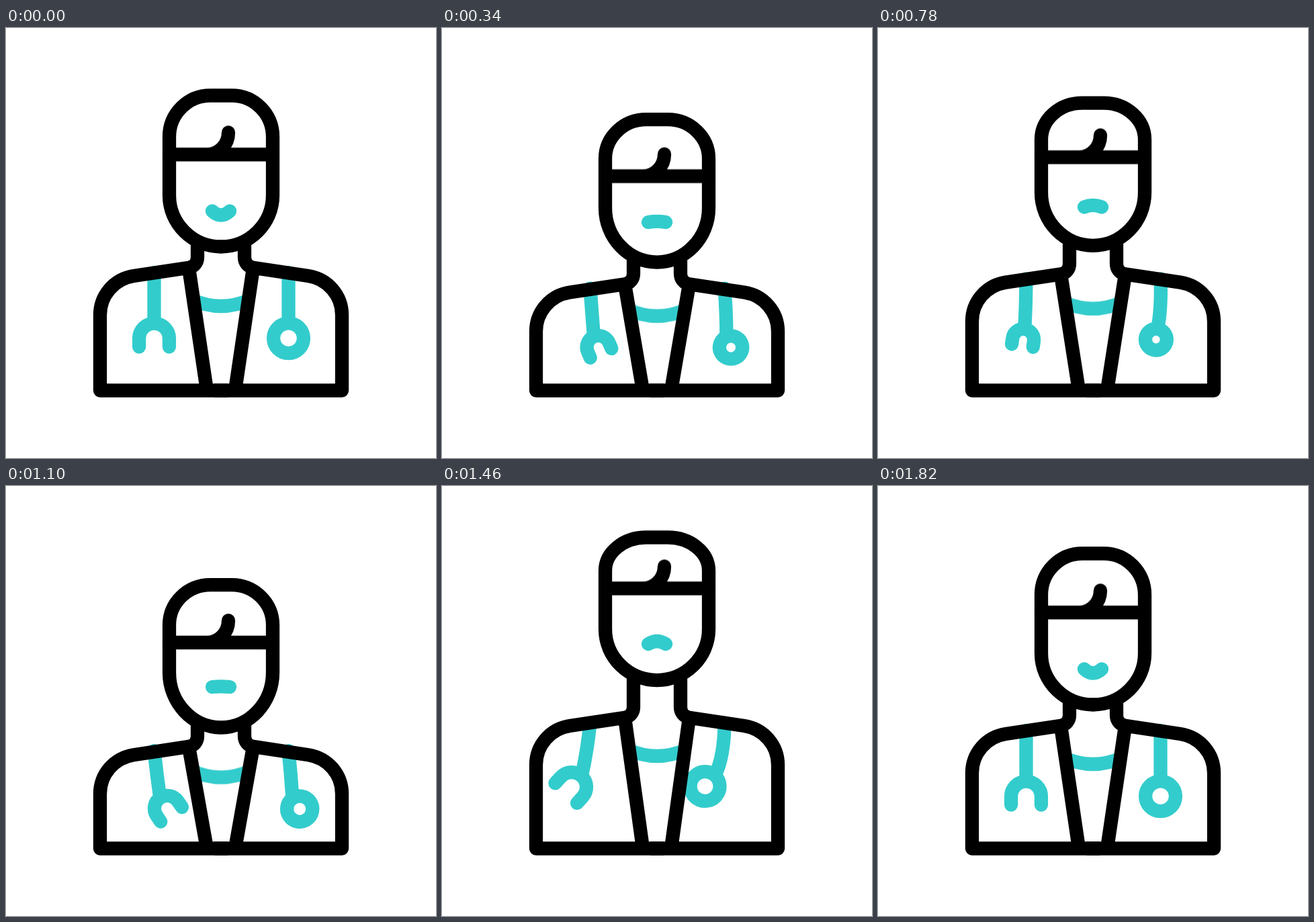
These frames come from a looping animation (640 px wide and 640 px high, 2.42 s). An HTML page without scripts:

```html
<!DOCTYPE html>
<html lang="en">
<head>
<meta charset="utf-8">
<title>Doctor</title>
<style>
html, body { margin: 0; width: 100%; height: 100%; overflow: hidden; background: #fff; }
svg { display: block; width: 100%; height: 100%; }
path {
  fill: none;
  stroke: #000;
  stroke-width: 20.3;
  stroke-linejoin: round;
  animation: 2.42s cubic-bezier(.333, 0, .667, 1) infinite;
}
.teal path { stroke: #3cc; }
.round { stroke-linecap: round; }

/* Each part moves rest, down, up, down, up, rest, then holds. */
.head { animation-name: head; }
.hair { animation-name: hair; }
.mouth { animation-name: mouth; }
.coat { animation-name: coat; }
.collar { animation-name: collar; }
.fork { animation-name: fork; }
.ring { animation-name: ring; }

@keyframes head {
  0%, 74.38%, 100% { d: path("M304 100.5H336C369.7 100.5 397 128 397 162V249C397 291.3 362.3 325.5 320 325.5S243 291.3 243 249V162C243 128 270.3 100.5 304 100.5Z"); }
  8.264%, 41.322% { d: path("M304 160.7H336C369.7 160.7 397 188.6 397 222.7V290C397 336 362.3 373.3 320 373.3S243 336 243 290V222.7C243 188.6 270.3 160.7 304 160.7Z"); }
  24.793%, 57.851% { d: path("M304 74.9H336C369.7 74.9 397 96.8 397 123.6V210.7C397 252.6 362.3 286.6 320 286.6S243 252.6 243 210.7V123.6C243 96.8 270.3 74.9 304 74.9Z"); }
}
@keyframes hair {
  0%, 74.38%, 100% { transform: translateY(188.3px); }
  8.264%, 41.322% { transform: translateY(248.7px); }
  24.793%, 57.851% { transform: translateY(150px); }
}
@keyframes mouth {
  0%, 74.38%, 100% { d: path("M307 272.5Q320 284.5 333 272.5"); }
  8.264%, 41.322% { d: path("M307 311.6Q320 311.8 333 311.6"); }
  24.793%, 57.851% { d: path("M307 232.6Q320 223.3 333 232.6"); }
}
@keyframes coat {
  0%, 74.38%, 100% { d: path("M285 317V341C285 349 280 355.5 272 356.7L190 369C161 373.5 140 398 140 427V539.5H330M272 356.7L299 539.5"); }
  8.264%, 41.322% { d: path("M285 364V380.5C285 388.5 280 395 272 396.2L190 408.5C161 413 140 437.5 140 466.5V539.5H330M272 396.2L299 539.5"); }
  24.793%, 57.851% { d: path("M285 278V328.2C285 336.2 280 342.7 272 343.9L190 356.2C161 360.7 140 385.2 140 414.2V539.5H330M272 343.9L299 539.5"); }
}
@keyframes collar {
  0%, 74.38%, 100% { transform: translateY(414px); }
  8.264%, 41.322% { transform: translateY(439.7px); }
  24.793%, 57.851% { transform: translateY(401.2px); }
}
/* Tiny arc radii grow to a half circle on their chord, so the swing squeezes the loops. */
@keyframes fork {
  0%, 74.38%, 100% { d: path("M220.5 364.2Q220.5 402 220.5 439.6M198.1 474.5L198.1 462A1 1 0 0 1 242.9 462L242.9 474.5"); }
  8.264%, 41.322% { d: path("M220.5 402Q226 436 233.5 470.4M242.3 510.9L233.5 502A1 1 0 0 1 265.1 470.4L274 479.2"); }
  24.793%, 57.851% { d: path("M220.5 352Q216 393 207 431.3M166.5 440.1L175.4 431.3A1 1 0 0 1 207 462.9L198.2 471.8"); }
}
@keyframes ring {
  0%, 74.38%, 100% { d: path("M420.5 364.2Q420.5 402 420.5 439.3M398.1 461.7A1 1 0 0 1 442.9 461.7A1 1 0 0 1 398.1 461.7Z"); }
  8.264%, 41.322% { d: path("M420.5 402Q425 436 430.4 471.4M430.4 503A1 1 0 0 1 462 471.4A1 1 0 0 1 430.4 503Z"); }
  24.793%, 57.851% { d: path("M420.5 352Q420 403 405.4 430.2M373.8 430.2A1 1 0 0 1 405.4 461.8A1 1 0 0 1 373.8 430.2Z"); }
}
</style>
</head>
<body>
<svg viewBox="0 0 640 640">
  <g class="teal">
    <path class="collar" d="M276-10Q320 10 364-10"/>
    <path class="fork round"/>
    <path class="ring round"/>
    <path class="mouth round"/>
  </g>
  <path class="coat"/>
  <g transform="matrix(-1 0 0 1 640 0)"><path class="coat"/></g>
  <path class="head"/>
  <path class="hair round" d="M243 0H397M331-32.8C331-14.8 317 0 299 0"/>
</svg>
</body>
</html>
```
